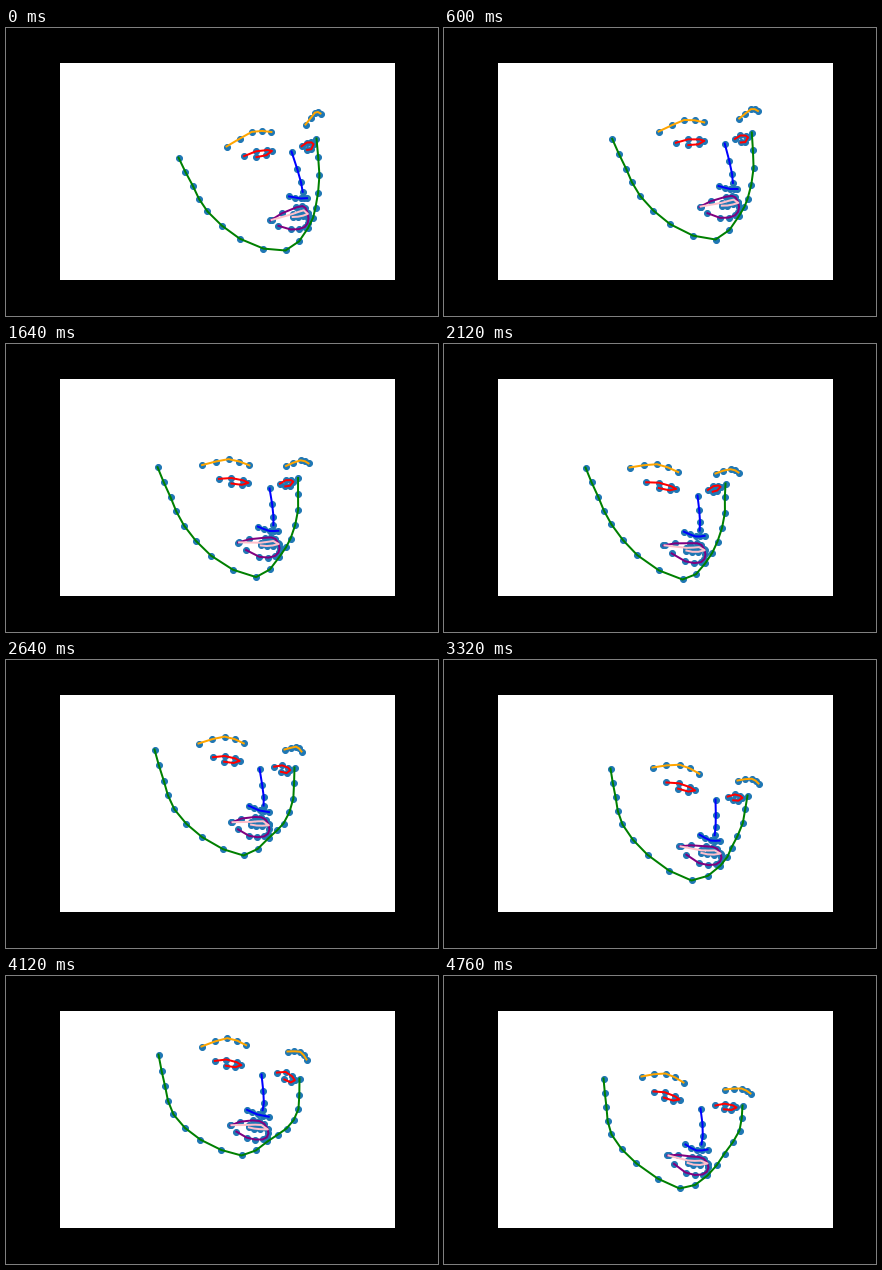
Recreate the animation shown at these times as a matplotlib script. Size 432x288 px, loop 4800 ms.

```python
import matplotlib.pyplot as plt
import numpy as np
from matplotlib.animation import FuncAnimation

W, H, DPI = 432, 288, 72
FRAMES, STEP = 120, 40


def spline(keys, count, closed=False):
    """Spread count points evenly along a smooth curve through the keys."""
    p = np.array(keys, float)
    if closed:
        p, spans = np.vstack([p[-1:], p, p[:2]]), len(p)
    else:
        p, spans = np.vstack([2 * p[0] - p[1], p, 2 * p[-1] - p[-2]]), len(p) - 1
    u = np.linspace(0, spans, count, endpoint=not closed)
    i = np.minimum(u.astype(int), spans - 1)
    f = (u - i)[:, None]
    a, b, c, d = (p[i + k] for k in range(4))
    return b + f / 2 * (c - a + f * (2 * a - 5 * b + 4 * c - d + f * (3 * (b - c) + d - a)))


def ring(start, end, along, drop):
    """Outline hung on the line between two corners."""
    start, end = np.array(start), np.array(end)
    return start + np.outer(along, end - start) + np.outer(drop, (0, 1))


def eye(start, end):
    return ring(start, end, [0, .43, .83, 1, .76, .4], [0, -2.7, -1.8, 0, 3, 3])


# Resting face: outline and colour of each part
PARTS = [
    (spline([(159, 102), (162, 131), (167, 158), (192, 187), (235, 212),
             (263, 199), (280, 177), (295, 154), (298, 129)], 17), "green"),
    (spline([(197, 100), (221, 97), (239, 106)], 5), "orange"),
    (spline([(280, 113), (297, 112), (306, 117)], 5), "orange"),
    (spline([(256, 132), (258.5, 154), (257, 168)], 4), "blue"),
    (spline([(241, 168), (252, 174), (263, 173)], 5), "blue"),
    (eye((209, 115), (235, 123)), "red"),
    (eye((271, 129), (292, 131)), "red"),
    (spline([(223, 179), (247, 180), (259, 182), (264, 191), (258, 198), (241, 196)],
            12, closed=True), "purple"),
    (ring((224, 179), (263, 187), [0, .49, .67, .83, 1, .81, .64, .49],
          [0, 1, 0, -1.5, 0, 3, 4, 3.5]), "pink"),
]
FACE = np.vstack([points for points, _ in PARTS])
ENDS = np.cumsum([len(points) for points, _ in PARTS])[:-1]

# Handles that steer the face: five on the jaw, three on the brows,
# nose root and base, two mouth corners
HANDLES = [0, 4, 8, 12, 16, 17, 22, 26, 27, 33, 48, 54]

# Handle positions at the turning points of the head, by time in ms
POSES = {
    0: [(172, 129), (201, 183), (279, 222), (309, 179), (310, 110), (220, 118),
        (299, 96), (314, 85), (285, 123), (294, 170), (264, 192), (302, 190)],
    1160: [(150, 108), (177, 168), (250, 216), (284, 177), (291, 114), (195, 104),
           (277, 100), (299, 96), (262, 123), (264, 167), (233, 181), (274, 183)],
    2120: [(141, 123), (167, 180), (238, 235), (273, 197), (281, 139), (185, 123),
           (271, 129), (294, 128), (253, 151), (251, 192), (219, 201), (261, 210)],
    2640: [(148, 89), (168, 149), (237, 195), (277, 163), (288, 107), (192, 83),
           (278, 89), (295, 91), (253, 108), (253, 150), (225, 162), (263, 169)],
    3320: [(166, 108), (178, 164), (247, 220), (287, 187), (303, 135), (208, 107),
           (293, 120), (314, 123), (271, 139), (266, 180), (235, 186), (277, 197)],
    4120: [(152, 78), (167, 138), (235, 179), (280, 152), (293, 102), (195, 70),
           (281, 75), (300, 83), (255, 98), (251, 138), (224, 149), (262, 157)],
    4760: FACE[HANDLES],
}

# Head drift between the poses: time, dx, dy away from the straight path
DRIFT = [(580, 7, -8), (1400, 8, 1), (1680, 5, 7), (2260, 0, 9), (2840, 0, -5),
         (3480, 0, 13), (3700, -1, 20), (3940, -4, 15), (4500, 0, -6)]


def bend(a, b):
    r2 = ((a[:, None] - b[None]) ** 2).sum(axis=2)
    return r2 * np.log(r2 + 1e-12)


def warp_matrix(points, handles):
    """Thin-plate weights that carry handle positions to all points."""
    points, handles = points / 100, handles / 100
    n = len(handles)
    flat = np.column_stack([np.ones(n), handles])
    system = np.block([[bend(handles, handles), flat], [flat.T, np.zeros((3, 3))]])
    basis = np.column_stack([bend(points, handles), np.ones(len(points)), points])
    return (basis @ np.linalg.inv(system))[:, :n]


def timeline():
    poses = {t: np.array(p, float) for t, p in POSES.items()}
    full = dict(poses)
    for t, dx, dy in DRIFT:
        a = max(k for k in poses if k < t)
        b = min(k for k in poses if k > t)
        u = (t - a) / (b - a)
        full[t] = poses[a] * (1 - u) + poses[b] * u + (dx, dy)
    times = sorted(full)
    return np.array(times, float), np.array([full[t] for t in times])


def tangents(times, values):
    """Slopes that never overshoot a turning point."""
    slope = np.diff(values, axis=0) / np.diff(times)[:, None, None]
    a, b = slope[:-1], slope[1:]
    same = a * b > 0
    inner = np.where(same, 2 * a * b / np.where(same, a + b, 1), 0)
    return np.concatenate([slope[:1], inner, slope[-1:]])


WARP = warp_matrix(FACE, FACE[HANDLES])
TIMES, PATH = timeline()
SLOPES = tangents(TIMES, PATH)


def face_at(t):
    i = min(np.searchsorted(TIMES, t, side="right") - 1, len(TIMES) - 2)
    h = TIMES[i + 1] - TIMES[i]
    u = (t - TIMES[i]) / h
    ease = u * u * (3 - 2 * u)
    handles = (PATH[i] * (1 - ease) + PATH[i + 1] * ease
               + h * u * (1 - u) * ((1 - u) * SLOPES[i] - u * SLOPES[i + 1]))
    return WARP @ handles + 0.5


fig = plt.figure(figsize=(W / DPI, H / DPI), dpi=DPI, facecolor="black")
ax = fig.add_axes([0.125, 0.125, 0.775, 0.755], facecolor="white")
ax.set(xlim=(0.125 * W, 0.9 * W), ylim=(0.875 * H, 0.12 * H), xticks=[], yticks=[])
for spine in ax.spines.values():
    spine.set_visible(False)

dots = ax.scatter(*face_at(0).T, s=36, color="C0", zorder=1)
lines = [ax.plot([], [], color=color, lw=2, zorder=2)[0] for _, color in PARTS]


def draw(frame):
    face = face_at(frame * STEP)
    dots.set_offsets(face)
    for line, part in zip(lines, np.split(face, ENDS)):
        line.set_data(*part.T)
    return [dots, *lines]


anim = FuncAnimation(fig, draw, frames=FRAMES, interval=STEP, repeat=True, repeat_delay=0)
plt.show()
```
